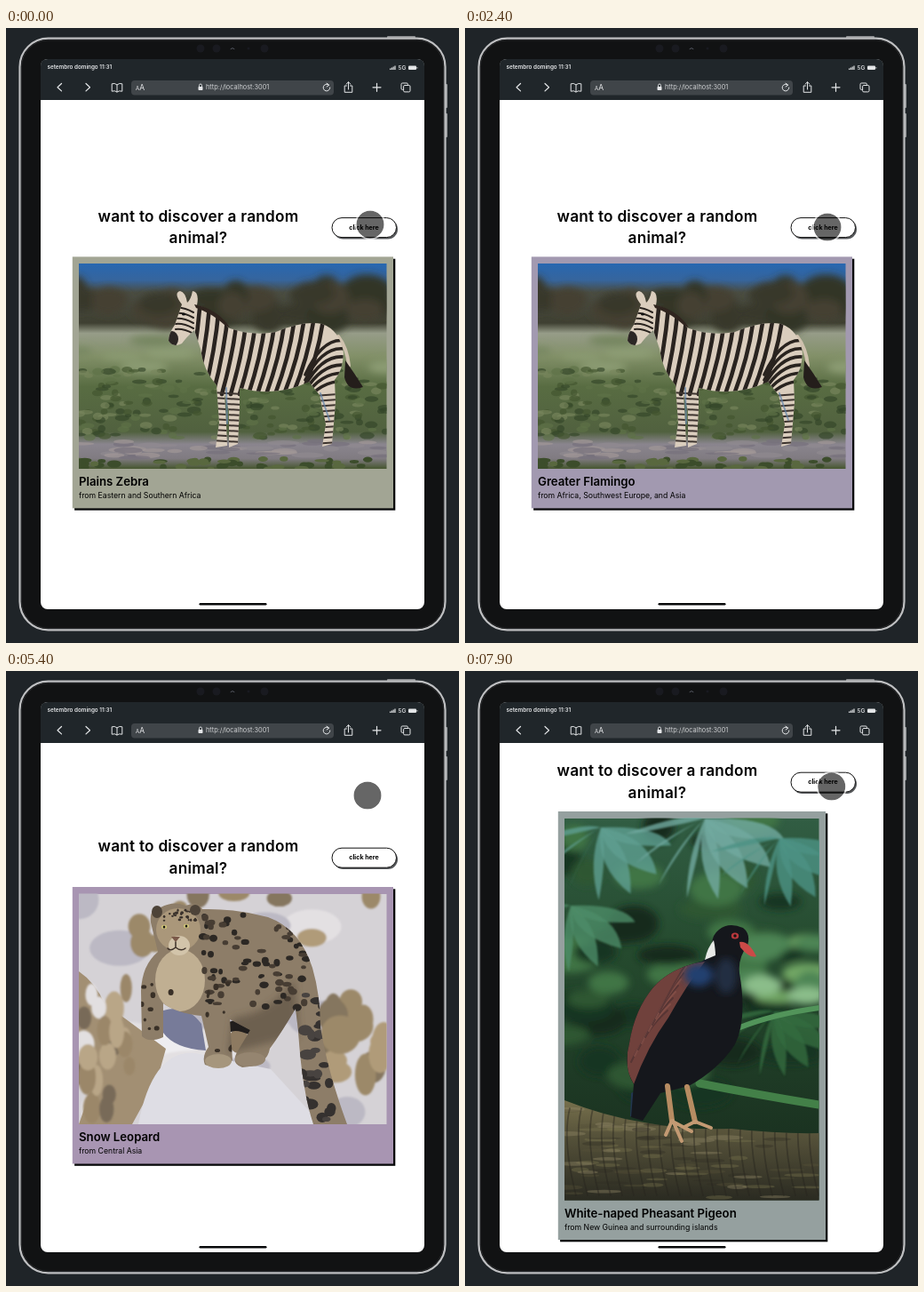
An HTML page that plays this animation: 510 by 692 pixels, repeating every 8000 ms.

```html
<!DOCTYPE html>
<html lang="en">
<head>
<meta charset="utf-8">
<title>Random animal</title>
<style>
html, body { margin: 0; width: 100%; height: 100%; overflow: hidden; background: #1f2428; }
svg { display: block; width: 510px; height: 692px; font-family: Inter, sans-serif; }
</style>
</head>
<body>
<svg id="stage" viewBox="0 0 510 692"></svg>
<script>
const LOOP = 8000;
const stage = document.getElementById('stage');

// Shape helpers
const path = (d, fill, more = '') => `<path d="${d}" fill="${fill}" ${more}/>`;
const line = (d, color, w = 1, more = '') =>
  `<path d="${d}" fill="none" stroke="${color}" stroke-width="${w}" stroke-linecap="round" stroke-linejoin="round" ${more}/>`;
const rect = (x, y, w, h, fill, more = '') =>
  `<rect x="${x}" y="${y}" width="${w}" height="${h}" fill="${fill}" ${more}/>`;
const oval = (x, y, rx, ry, fill, more = '') =>
  `<ellipse cx="${x}" cy="${y}" rx="${rx}" ry="${ry}" fill="${fill}" ${more}/>`;
const soft = (inner, n = 3) => `<g filter="url(#blur${n})">${inner}</g>`;
const repeat = (n, fn) => Array.from({ length: n }, (_, i) => fn(i)).join('');
const clipped = (id, d, fill, inner) =>
  `<clipPath id="${id}"><path d="${d}"/></clipPath>${path(d, fill)}<g clip-path="url(#${id})">${inner}</g>`;
const gradient = (id, ...stops) =>
  `<linearGradient id="${id}" x2="0" y2="1">${stops.map(([o, c]) =>
    `<stop offset="${o}" stop-color="${c}"/>`).join('')}</linearGradient>`;

function random(seed) {
  return () => (seed = (seed * 16807) % 2147483647) / 2147483647;
}

// Scattered ovals inside the box x, y, w, h
function scatter(seed, n, [x, y, w, h], rx, ry, colors, more = '') {
  const r = random(seed);
  return repeat(n, () => oval((x + r() * w).toFixed(1), (y + r() * h).toFixed(1),
    (rx * (.6 + r() * .8)).toFixed(1), (ry * (.6 + r() * .8)).toFixed(1),
    colors[Math.floor(r() * colors.length)], more));
}

function zebra() {
  const body = 'M198 311Q188 298 196 296Q202 297 204 309Q208 306 210 296Q218 297 215 312Q238 318 250 337' +
    'Q275 347 304 342Q335 329 356 333Q376 340 380 366Q379 386 370 396L371 421Q369 446 367 468L356 471L360 446L353 413' +
    'L341 398Q305 416 263 405L263 428L261 468L251 472L251 431L246 412L248 445L249 470L236 472L240 444L237 402' +
    'Q222 385 219 361L212 340Q203 348 198 355Q188 360 183 352Q183 344 190 334Z';
  const stripes =
    repeat(14, i => line(`M${218 + i * 10.8} 316Q${214 + i * 10.8} 362 ${203 + i * 10} 412`, '#29231f', 4.6)) +
    repeat(6, i => line(`M386 ${353 + i * 9}Q358 ${344 + i * 10} 337 ${390 + i * 6}`, '#29231f', 3.6)) +
    repeat(10, i => line(`M232 ${410 + i * 6}l34 2M346 ${414 + i * 6}l28 -2`, '#3d342f', 2)) +
    repeat(5, i => line(`M191 ${315 + i * 6}q9 -1 20 5`, '#29231f', 2)) +
    oval(187, 350, 7, 9, '#2b2624') + oval(200, 322, 2, 1.6, '#111');
  return rect(82, 265, 347, 231, 'url(#veld)') +
    soft(scatter(11, 34, [78, 292, 355, 36], 20, 13, ['#39382b', '#443f31', '#303528']) +
      scatter(3, 14, [78, 350, 355, 35], 24, 5, ['#8d9d74', '#75855f', '#9aa58a'])) +
    scatter(21, 210, [82, 384, 347, 78], 6, 3, ['#42552f', '#5f7248', '#344529', '#78865d'], 'opacity=".65"') +
    scatter(9, 40, [82, 464, 347, 20], 14, 2.5, ['#918a90', '#77717d', '#a19898'], 'opacity=".7"') +
    scatter(14, 45, [82, 484, 347, 12], 6, 3, ['#3c4d2b', '#59683f']) +
    line('M374 347Q384 360 386 380', '#cfc1ae', 4) + path('M382 374Q392 388 402 404Q385 410 381 393Z', '#241e1b') +
    clipped('zebraBody', body, '#dacdbd', stripes) +
    path('M212 311Q238 316 252 337L246 334Q232 321 214 315Z', '#30251f') +
    line('M248 405l1 40M354 411l10 30', '#6283a8', 2, 'opacity=".7"');
}

function flamingo() {
  const body = 'M101 416Q128 382 162 356Q202 333 244 332Q278 335 304 362Q318 361 320 349Q318 322 309 294' +
    'Q296 262 299 238Q303 213 329 208Q352 208 359 228L353 246Q337 234 325 240Q316 250 320 270' +
    'Q337 310 341 348Q338 375 318 397Q288 427 246 430L211 435Q187 432 180 418Q140 414 101 416Z';
  const feathers =
    repeat(13, i => line(`M${150 + i * 11} ${352 - i * 2}q-12 28 ${-34 + i} ${48 + i}`, i % 3 ? '#b49b92' : '#dfc9bf', 2, 'opacity=".65"')) +
    path('M101 417Q145 380 166 384Q148 400 166 414Z', '#bd7269', 'opacity=".75"') +
    path('M225 410Q262 386 290 371Q282 398 250 406Z', '#b9504f', 'opacity=".8"') +
    path('M190 422Q270 410 335 365L330 415L220 446Z', '#a78374', 'opacity=".55"') +
    line('M316 370Q333 342 319 305Q302 265 308 235', '#ecd6c8', 7, 'opacity=".55"');
  const legs = line('M212 432L208 470L206 501M235 432L232 470L231 502', '#c86361', 5.5);
  return rect(82, 181, 347, 400, 'url(#water)') +
    soft(line('M208 504L212 570M231 505L235 572', '#a94148', 8), 1) +
    line('M207 506l5 62M231 506l4 63', '#c4525a', 4) +
    line('M180 573q30 -5 70 0t58 0M190 578q45 -4 100 0', '#9b8379', 1.5, 'opacity=".7"') +
    scatter(31, 14, [275, 494, 95, 31], 2.5, 1, ['#302d2d', '#493e3c']) +
    legs + clipped('flamingoBody', body, '#cfb3a8', feathers) +
    path('M343 221Q357 216 362 232Q373 246 374 261L371 275L355 273Q357 255 348 243Z', '#d8706f') +
    path('M357 275L373 261Q373 282 361 290Q355 287 357 275Z', '#171718') +
    oval(351, 226, 2.4, 2.2, '#d7bb53') + oval(351, 226, 1, 1, '#222');
}

function leopard() {
  const rocks = ['#9c8969', '#b09b79', '#85765f'];
  const body = 'M163 283Q161 267 174 266Q189 258 202 264Q216 259 221 268Q258 267 295 277Q331 290 345 334' +
    'Q354 365 354 401Q362 450 384 510L346 510Q333 471 329 405L326 380Q310 407 297 425Q294 444 266 446' +
    'Q253 442 260 429L275 404L252 392L255 438Q245 451 224 443Q220 434 228 423L220 388Q192 385 177 374' +
    'L177 412Q161 419 153 411L152 360Q153 331 171 316Z';
  const coat = oval(196, 348, 28, 35, '#c9b89b', 'opacity=".85"') + oval(194, 291, 25, 24, '#aa977a') +
    soft(path('M255 390Q300 385 325 345L330 410L250 430Z', '#55483b', 'opacity=".55"')) +
    scatter(17, 85, [222, 274, 118, 105], 4, 3, ['#2c2824', '#473d33']) +
    scatter(41, 28, [152, 338, 104, 94], 2.5, 2.6, ['#393027']) +
    scatter(29, 30, [332, 355, 45, 155], 7, 4.5, ['#35312f', '#484340']) +
    scatter(7, 24, [178, 267, 38, 15], 1.6, 1.3, ['#39312b']);
  const face = oval(195, 309, 12, 11, '#d2c4aa') + path('M186 299h10l-5 6z', '#795848') +
    line('M191 305v6M191 311q-6 5 -9 1M191 311q6 5 11 1', '#3d3129', 1.5) +
    oval(178, 288, 3, 2.2, '#d3c879') + oval(203, 287, 3, 2.2, '#d3c879') +
    oval(178, 288, 1.3, 1.6, '#161514') + oval(203, 287, 1.3, 1.6, '#161514') +
    oval(170, 271, 6, 7, '#4d4338') + oval(213, 269, 6, 6, '#4d4338');
  return rect(82, 251, 347, 259, '#d5d2d6') +
    soft(scatter(61, 28, [82, 251, 347, 259], 33, 16, ['#eeedf0', '#bcb9c4', '#e3e0e2']) +
      scatter(19, 13, [150, 250, 280, 75], 14, 12, rocks) +
      scatter(43, 14, [360, 370, 68, 88], 17, 18, rocks), 1) +
    path('M82 338Q100 350 111 374L180 425L171 457L142 510H82L96 470L82 448Z', '#a28f73') +
    soft(scatter(5, 22, [82, 355, 62, 150], 9, 14, ['#e2dfe0', '#9b8769', '#786a59', '#b9a687']), 1) +
    path('M149 510Q165 426 213 430L298 448L355 510Z', '#dedde4') +
    path('M177 382Q203 374 220 397L225 427Q190 425 177 407Z', '#777b99') +
    oval(262, 416, 11, 14, '#8d7a61') + path('M251 395l29 -10l-5 25q-16 -8 -24 -3z', '#201d1c') +
    clipped('leopardBody', body, '#8d7d68', coat) + face +
    oval(239, 439, 15, 8, '#a6967d') + oval(275, 437, 17, 8, '#958570');
}

function pigeon() {
  const leaf = (x, y, dx, dy, c, o = .8) =>
    path(`M${x} ${y}q${dx * .2 - dy * .18} ${dy * .5 + dx * .18} ${dx} ${dy}q${dx * -.2 + dy * .12} ${dy * -.65 - dx * .12} ${-dx} ${-dy}`, c, `opacity="${o}"`);
  const fan = (x, y, n, len, c) => repeat(n, i => {
    const a = .25 + i * 2.7 / (n - 1);
    return leaf(x, y, Math.cos(a) * len, Math.sin(a) * len, c);
  });
  const log = 'M112 483Q157 501 202 508Q248 517 300 515Q354 521 399 520V596H112Z';
  const body = 'M280 319Q274 300 286 291Q297 282 313 289Q322 296 318 309Q307 323 309 340Q318 392 304 420' +
    'Q286 448 252 467L220 475L200 506L187 502L190 465Q178 446 185 419Q191 381 212 356Q230 335 266 327Z';
  return rect(112, 166, 287, 430, 'url(#forest)') +
    soft(scatter(77, 50, [108, 166, 295, 310], 26, 15, ['#183621', '#2d5732', '#417445', '#132a1b']) +
      scatter(13, 12, [318, 288, 80, 85], 23, 9, ['#72a765', '#8bbd8a', '#4d8554'])) +
    soft(fan(153, 176, 7, 82, '#609f91') + fan(270, 166, 8, 92, '#72aaa1') + fan(354, 188, 8, 78, '#4d9385') +
      fan(119, 264, 7, 75, '#4e8d68') + fan(348, 383, 8, 74, '#356c40'), 1) +
    line('M307 402Q347 386 399 379', '#52945a', 6) + line('M264 464Q325 476 398 488', '#438048', 9) +
    clipped('log', log, 'url(#bark)',
      scatter(37, 100, [112, 490, 287, 105], 15, 2, ['#77704d', '#302d24', '#565238', '#928768'], 'opacity=".4"') +
      repeat(22, i => line(`M${118 + i * 13} 492q-9 36 7 98`, '#26251d', 1.8, 'opacity=".45"'))) +
    path('M187 475l15 -7l-5 35l-11 -2z', '#21364f') +
    clipped('pigeonBody', body, '#15171c',
      path('M270 327Q220 332 195 380Q180 410 183 451L190 465Q205 423 229 390Q249 354 270 327Z', '#70413c') +
      repeat(9, i => line(`M${187 + i * 4} ${440 - i * 7}q18 -38 ${41 - i} -58`, i % 2 ? '#8d554c' : '#4b2f31', 2, 'opacity=".65"')) +
      soft(oval(263, 342, 16, 13, '#213f70') + oval(294, 343, 12, 20, '#202d43'))) +
    path('M280 303Q282 313 282 320L270 325Q273 311 280 303Z', '#e7e9e6') +
    path('M309 305Q319 303 328 321Q321 324 310 311Z', '#cb4a47') +
    oval(304, 298, 4.2, 3.5, '#b9383d') + oval(304, 298, 1.7, 1.7, '#151313') +
    line('M228 467l5 39M250 468l9 39', '#b78c62', 6) +
    line('M233 506l-7 16M234 506l10 23M234 507l21 11M259 507l-12 6M259 507l18 7', '#c39a73', 4);
}

const scenes = [
  { start: 0, swap: 0, x: 82, y: 265, w: 346.5, h: 231, color: [162, 165, 148], photo: zebra,
    name: 'Plains Zebra', place: 'from Eastern and Southern Africa' },
  { start: 1800, swap: 2800, x: 82, y: 180.6, w: 346.5, h: 400, color: [162, 153, 176], photo: flamingo,
    name: 'Greater Flamingo', place: 'from Africa, Southwest Europe, and Asia' },
  { start: 4300, swap: 4700, x: 82, y: 250.6, w: 346.5, h: 259.5, color: [168, 149, 178], photo: leopard,
    name: 'Snow Leopard', place: 'from Central Asia' },
  { start: 6300, swap: 6500, x: 112, y: 165.6, w: 286.5, h: 430, color: [149, 160, 159], photo: pigeon,
    name: 'White-naped Pheasant Pigeon', place: 'from New Guinea and surrounding islands' }
];

// Pointer stops: time, x, y
const stops = [[0, 410, 221], [900, 410, 221], [1600, 408, 224], [3600, 408, 224], [4100, 407, 140],
  [5400, 407, 140], [5900, 404, 208], [7000, 404, 208], [7500, 412, 177], [7600, 412, 177],
  [7800, 413, 130], [LOOP, 412.5, 130]];

const defs = `<defs>
  <filter id="blur1"><feGaussianBlur stdDeviation="1.2"/></filter>
  <filter id="blur3"><feGaussianBlur stdDeviation="4"/></filter>` +
  gradient('veld', [0, '#2867b0'], [.08, '#36659d'], [.14, '#4a4d43'], [.29, '#3f4032'], [.34, '#969c88'],
    [.45, '#829068'], [.6, '#586c42'], [.82, '#51613f'], [.88, '#8a858e'], [.95, '#807b81'], [1, '#46562f']) +
  gradient('water', [0, '#565758'], [.55, '#5a5b5d'], [.65, '#606265'], [1, '#505459']) +
  gradient('forest', [0, '#315d43'], [.35, '#254a2e'], [1, '#172a1c']) +
  gradient('bark', [0, '#77704c'], [.35, '#56523a'], [1, '#2a2a21']) +
  scenes.map((s, i) => `<clipPath id="frame${i}">${rect(s.x, s.y, s.w, s.h, '#000')}</clipPath>`).join('') +
  '</defs>';

function device() {
  const ink = '#e4e6e8';
  return rect(0, 0, 510, 692, '#1f2428') +
    rect(429, 9, 32, 4, '#8d8f92', 'rx="1"') + rect(494, 63, 3, 27, '#96989b', 'rx="1"') +
    rect(494, 96, 3, 27, '#96989b', 'rx="1"') +
    rect(15.5, 11.7, 479, 665.6, '#111213', 'rx="32" stroke="#bfc0c2" stroke-width="2.2"') +
    rect(17.5, 13.7, 475, 661.6, 'none', 'rx="30" stroke="#292a2c"') +
    [219, 237, 273, 291].map(x => oval(x, 23, x === 273 ? 1.5 : 4.5, x === 273 ? 1.5 : 4.5, '#191a20')).join('') +
    line('M253 23.5q2 -2 4 0', '#555962', 1) +
    rect(39, 35, 432, 619, '#fff', 'rx="8"') +
    path('M39 81V43q0 -8 8 -8H463q8 0 8 8V81Z', '#20262a') +
    `<text x="46.5" y="46.2" font-size="6.3" font-weight="600" fill="${ink}">setembro domingo 11:31</text>` +
    `<text x="441.5" y="47" font-size="6.6" font-weight="500" fill="${ink}">5G</text>` +
    repeat(4, i => rect(432 + i * 1.8, 45.5 - i, 1.2, 1.5 + i, ink)) +
    rect(453, 42.5, 9, 4.5, ink, 'rx="1"') + rect(462.5, 44, .8, 1.6, ink) +
    rect(141, 59, 228, 16.5, '#404549', 'rx="4"') +
    line('M62.5 62.5l-4.5 4.2l4.5 4.2M90 62.5l4.5 4.2l-4.5 4.2', ink, 1.2) +
    line('M125 64v8q-2.5 -2 -5.8 -.8v-8.4q3.3 -1.2 5.8 1.2q2.5 -2.4 5.8 -1.2v8.4q-3.3 -1.2 -5.8 .8', ink) +
    `<text x="146" y="70" font-size="6" fill="${ink}">A<tspan font-size="8.5">A</tspan></text>` +
    rect(216.5, 66, 5, 4, ink, 'rx=".7"') + line('M217.5 66v-1.4q0 -1.6 1.5 -1.6t1.5 1.6v1.4', ink, .9) +
    `<text x="225" y="69.3" font-size="7.35" fill="#cfd1d3">http://localhost:3001</text>` +
    line('M363.5 64.2a3.8 3.8 0 1 0 1.3 2.8M361 62.2l2.8 2l-2.7 1.8', ink) +
    line('M383.5 65h-2.3v7.3h8.6v-7.3h-2.3M385.5 69v-8M383 63.2l2.5 -2.4l2.5 2.4', ink) +
    line('M417.5 62.3v9M413 66.8h9', ink, 1.2) +
    rect(445, 62, 7.4, 7.4, 'none', `rx="1.3" stroke="${ink}"`) +
    rect(447.6, 64.5, 7.4, 7.4, '#20262a', `rx="1.3" stroke="${ink}"`) +
    rect(217.5, 647, 76, 2.6, '#08090a', 'rx="1.3"');
}

// Coordinates here are relative to the top of the card
const header = `<g id="header">
  <g font-size="17.2" font-weight="600" letter-spacing=".25" text-anchor="middle">
    <text x="216.5" y="-39.8">want to discover a random</text><text x="216.5" y="-15.2">animal?</text>
  </g>` +
  rect(368.5, -42, 72.5, 22, '#55575a', 'rx="11"') +
  rect(367, -43.8, 72.5, 22, '#fff', 'rx="11" stroke="#111"') +
  '<text x="403" y="-30.6" font-size="7.1" font-weight="700" text-anchor="middle">click here</text></g>';

stage.innerHTML = defs + device() + header +
  '<rect id="shadow"/><rect id="card"/>' +
  scenes.map((s, i) => `<g class="photo" clip-path="url(#frame${i})">${s.photo()}</g>`).join('') +
  '<text id="name" font-size="13.2" font-weight="600"/><text id="place" font-size="8.7"/>' +
  `<g id="pointer">${oval(0, 0, 15.6, 15.6, '#000', 'opacity=".6"')}
    <circle r="16.4" fill="none" stroke="#fff" stroke-opacity=".65" stroke-width="1.8"/></g>`;

const el = id => document.getElementById(id);
const set = (id, attrs) => {
  for (const key in attrs) el(id).setAttribute(key, attrs[key]);
};
const photos = stage.querySelectorAll('.photo');
const clamp = v => Math.max(0, Math.min(1, v));
const ease = v => v * v * (3 - 2 * v);
const mix = (a, b, k) => a + (b - a) * k;

function render(t) {
  const now = scenes.findLastIndex(s => t >= s.start);
  const shown = scenes.findLastIndex(s => t >= s.swap);
  const data = scenes[now], prev = scenes[Math.max(0, now - 1)], box = scenes[shown];
  const fade = clamp((t - data.start) / 300);
  const color = data.color.map((c, i) => Math.round(mix(prev.color[i], c, fade)));
  const x = box.x - 7.2, y = box.y - 7.6, bottom = box.y + box.h;
  const size = { width: box.w + 14.7, height: box.h + 52 };

  set('header', { transform: `translate(0 ${y})` });
  set('shadow', { x: x + 2.3, y: y + 2.3, fill: '#08090a', ...size });
  set('card', { x, y, fill: `rgb(${color})`, ...size });
  photos.forEach((p, i) => { p.style.display = i === shown ? '' : 'none'; });
  set('name', { x: box.x, y: bottom + 19 });
  set('place', { x: box.x, y: bottom + 33 });
  el('name').textContent = data.name;
  el('place').textContent = data.place;

  const i = Math.min(stops.length - 2, stops.findLastIndex(s => t >= s[0]));
  const [a, b] = [stops[i], stops[i + 1]];
  const k = ease(clamp((t - a[0]) / (b[0] - a[0])));
  set('pointer', { transform: `translate(${mix(a[1], b[1], k)} ${mix(a[2], b[2], k)})` });
}

function tick() {
  render(performance.now() % LOOP);
  requestAnimationFrame(tick);
}
tick();
</script>
</body>
</html>
```
